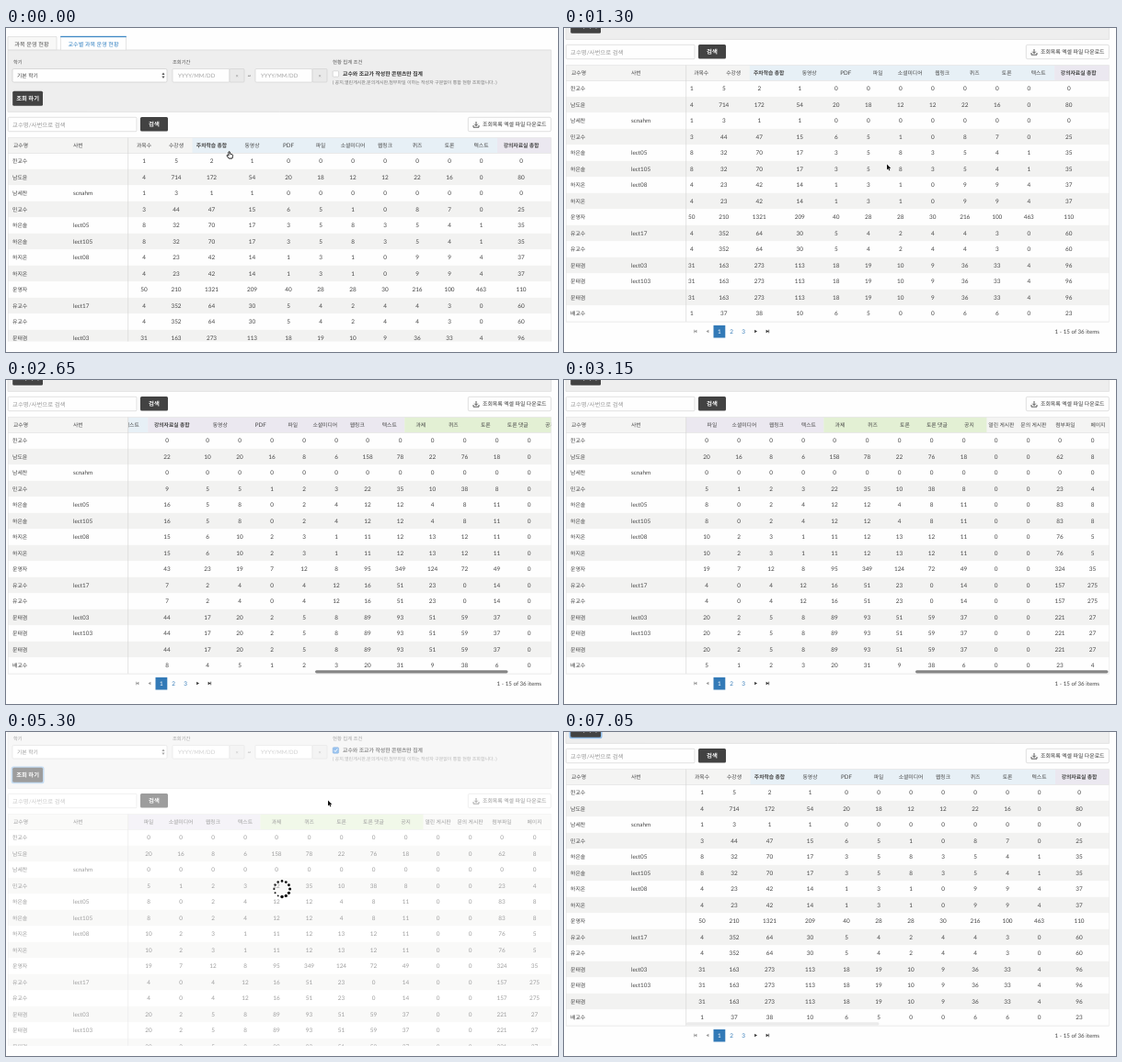
Write an HTML page with a canvas that moves like this. It is 600 px wide and 353 px high and loops after 7.1 s.

```html
<!DOCTYPE html>
<html lang="ko">
<head>
<meta charset="utf-8">
<style>
html, body { margin: 0; width: 100%; height: 100%; overflow: hidden; background: #fefefe; }
canvas { display: block; width: 600px; height: 353px; }
</style>
</head>
<body>
<canvas id="stage"></canvas>
<script>
const W = 600, H = 353, LOOP = 7100;
const VIEW_H = 341.5, LEFT = 2, RIGHT = 592.5, FREEZE = 133, ROW_H = 17.5;
const MAX_X = 536.5, MAX_Y = 79;
const FONT = 'Lato, "Noto Sans CJK KR", "Noto Sans CJK", "Noto Sans", sans-serif';
const INK = '#444', DARK = '#424242';

const canvas = document.getElementById('stage');
const ctx = canvas.getContext('2d');
const dpr = window.devicePixelRatio || 1;
canvas.width = W * dpr;
canvas.height = H * dpr;

// column label and centre
const COLS = [
  ['과목수', 150], ['수강생', 185], ['주차학습 총합', 223.5], ['동영상', 267.5], ['PDF', 307],
  ['파일', 342], ['소셜미디어', 377], ['웹링크', 412], ['퀴즈', 447], ['토론', 482],
  ['텍스트', 516.5], ['강의자료실 총합', 560], ['동영상', 612.5], ['PDF', 656.5], ['파일', 691.5],
  ['소셜미디어', 726.5], ['웹링크', 761.5], ['텍스트', 796.5], ['과제', 830.5], ['퀴즈', 866],
  ['토론', 901], ['토론 댓글', 936], ['공지', 971], ['열린 게시판', 1006], ['문의 게시판', 1041],
  ['첨부파일', 1075.5], ['페이지', 1111]
];
// header tint: from, to, colour
const GROUPS = [[202.5, 534, '#e7f0f6'], [534, 813, '#ebe8f0'], [813, 990, '#e3f0d4']];

const STATS = {
  한교수: '1 5 2 1',
  남도윤: '4 714 172 54 20 18 12 12 22 16 0 80 22 10 20 16 8 6 158 78 22 76 18 0 0 62 8',
  남세찬: '1 3 1 1',
  민교수: '3 44 47 15 6 5 1 0 8 7 0 25 9 5 5 1 2 3 22 35 10 38 8 0 0 23 4',
  하은솔: '8 32 70 17 3 5 8 3 5 4 1 35 16 5 8 0 2 4 12 12 4 8 11 0 0 83 8',
  하지온: '4 23 42 14 1 3 1 0 9 9 4 37 15 6 10 2 3 1 11 12 13 12 11 0 0 76 5',
  운영자: '50 210 1321 209 40 28 28 30 216 100 463 110 43 23 19 7 12 8 95 349 124 72 49 0 0 324 35',
  유교수: '4 352 64 30 5 4 2 4 4 3 0 60 7 2 4 0 4 12 16 51 23 0 14 0 0 157 275',
  문태겸: '31 163 273 113 18 19 10 9 36 33 4 96 44 17 20 2 5 8 89 93 51 59 37 0 0 221 27',
  배교수: '1 37 38 10 6 5 0 0 6 6 0 23 8 4 5 1 2 3 20 31 9 38 6 0 0 23 4'
};
const ROWS = [
  ['한교수'], ['남도윤'], ['남세찬', 'scnahm'], ['민교수'], ['하은솔', 'lect05'], ['하은솔', 'lect105'],
  ['하지온', 'lect08'], ['하지온'], ['운영자'], ['유교수', 'lect17'], ['유교수'],
  ['문태겸', 'lect03'], ['문태겸', 'lect103'], ['문태겸'], ['배교수']
].map(([name, id = '']) => ({ name, id, cells: STATS[name].split(' ') }));

// motion tracks: [time, value...], eased when the last item is true
const SCROLL_Y = [[350, 0], [1000, 79], [3450, 79], [3900, 17.5], [3980, 17.5], [4200, 30], [5650, 30], [6050, 79]];
const BODY_X = [[1250, 0], [1300, 11], [1400, 38], [2200, 313], [2950, 520], [3080, MAX_X], [6200, MAX_X], [6880, 0]];
const HEAD_X = [[1290, 0], [1300, 0.7], [1500, 22], [2200, 228.5], [2950, 480], [3150, 530.5], [3200, MAX_X], [6250, MAX_X], [6980, 0]];
const MOUSE_X = [[200, 243], [1000, 351], [3450, 351], [3950, 343], [4050, 343], [4250, 358], [4400, 358], [4700, 24], [4850, 24], [5200, 350]];
const MOUSE_Y = [[200, 138], [1000, 151], [3450, 151], [3950, 36], [4050, 36], [4250, 21], [4400, 21], [4700, 48], [4850, 48], [5200, 77]];

const smooth = u => u * u * (3 - 2 * u);
const linear = u => u;

function track(keys, t, ease = smooth) {
  if (t <= keys[0][0]) return keys[0][1];
  for (let i = 1; i < keys.length; i++) {
    const [t0, a] = keys[i - 1], [t1, b] = keys[i];
    if (t <= t1) return a + (b - a) * ease((t - t0) / (t1 - t0));
  }
  return keys[keys.length - 1][1];
}

// 1 between a and b, fading in and out around them
const pulse = (t, a, b, fade = 150) =>
  Math.max(0, Math.min(1, (t - a) / 60, (b + fade - t) / fade));

function text(str, x, y, size = 5.8, color = INK, align = 'left', weight = 400) {
  ctx.font = `${weight} ${size}px ${FONT}`;
  ctx.fillStyle = color;
  ctx.textAlign = align;
  ctx.fillText(str, x, y + size * 0.36);
}

function rect(x, y, w, h, fill) {
  ctx.fillStyle = fill;
  ctx.fillRect(x, y, w, h);
}

function box(x, y, w, h, r, fill, stroke) {
  ctx.beginPath();
  ctx.roundRect(x, y, w, h, r);
  ctx.fillStyle = fill;
  ctx.fill();
  if (stroke) {
    ctx.strokeStyle = stroke;
    ctx.lineWidth = 0.6;
    ctx.stroke();
  }
}

function poly(points, fill) {
  ctx.beginPath();
  points.forEach(([x, y]) => ctx.lineTo(x, y));
  ctx.closePath();
  ctx.fillStyle = fill;
  ctx.fill();
}

function clipTo(x, y, w, h, draw) {
  ctx.save();
  ctx.beginPath();
  ctx.rect(x, y, w, h);
  ctx.clip();
  draw();
  ctx.restore();
}

function drawTabs() {
  rect(LEFT, 23.7, RIGHT - LEFT, 0.6, '#d4d4d4');
  box(2, 9.5, 53, 14.5, 0, '#f8f8f7', '#d4d4d4');
  text('과목 운영 현황', 28, 18, 6.2, '#555', 'center');
  box(59.5, 9.5, 71, 14.8, 0, '#fefefe', '#d4d4d4');
  rect(59.2, 8.8, 71.6, 1.3, '#3d87c4');
  text('교수별 과목 운영 현황', 95, 18, 6.1, '#2f7fc1', 'center');
}

function drawDate(x) {
  box(x, 44.5, 62, 14.5, 1, '#fefefe', '#cfcfcf');
  box(x + 62, 44.5, 16, 14.5, 1, '#e9e9e9', '#cfcfcf');
  text('YYYY/MM/DD', x + 6, 51.8, 6, '#a2a2a2');
  text('×', x + 70, 51.8, 5.5, '#8a8a8a', 'center');
}

function drawFilters(checked, focused) {
  box(LEFT, 24.2, RIGHT - LEFT, 67.2, 0, '#eeeeee', '#d9d9d9');
  text('학기', 8, 37.5, 5.3, '#555');
  box(7, 44.5, 168, 14.5, 1.5, '#fefefe', '#c4c4c4');
  text('기본 학기', 12, 51.7, 5.8);
  poly([[169.4, 51], [171, 48.4], [172.6, 51]], '#555');
  poly([[169.4, 52.4], [171, 55], [172.6, 52.4]], '#555');
  text('조회기간', 181, 37.5, 5.3, '#555');
  drawDate(181);
  text('~', 264.5, 51.8, 6.5, INK, 'center');
  drawDate(271);
  text('현황 집계 조건', 355, 37.5, 5.4, '#555');
  box(355.2, 46.8, 6.4, 6.4, 1, checked ? '#3b8be0' : '#fefefe', checked ? '#2f78c8' : '#c4c4c4');
  if (checked) {
    ctx.beginPath();
    ctx.moveTo(356.7, 50);
    ctx.lineTo(358, 51.5);
    ctx.lineTo(360.3, 48.3);
    ctx.strokeStyle = '#fff';
    ctx.lineWidth = 0.9;
    ctx.stroke();
  }
  text('교수와 조교가 작성한 콘텐츠만 집계', 366, 50, 5.9, '#333', 'left', 700);
  text('( 공지,열린게시판,문의게시판,첨부파일 이하는 작성자 구분없이 통합 현황 조회합니다. )', 355, 59.2, 5, '#777');
  if (focused) box(5.7, 67.4, 35.8, 18.8, 2.5, '#8fbbe6');
  box(7.2, 68.8, 32.8, 16, 1.5, DARK);
  text('조회 하기', 23.6, 76.8, 6.3, '#fff', 'center', 700);
}

function drawToolbar() {
  box(2.3, 97.3, 139.7, 15.4, 1, '#fefefe', '#cfcfcf');
  text('교수명/사번으로 검색', 7, 105.2, 6.4, '#999');
  box(146, 97, 30, 15.5, 1.5, DARK);
  text('검색', 161, 104.9, 6.4, '#fff', 'center', 700);
  box(502.3, 97.3, 90, 15.4, 1.5, '#fefefe', '#cccccc');
  ctx.beginPath();
  for (const [x, y, dx, dy] of [[511, 102, 0, 4.5], [511, 106.5, -1.8, -1.8], [511, 106.5, 1.8, -1.8]]) {
    ctx.moveTo(x, y);
    ctx.lineTo(x + dx, y + dy);
  }
  ctx.moveTo(508, 106);
  ctx.lineTo(508, 108.2);
  ctx.lineTo(514, 108.2);
  ctx.lineTo(514, 106);
  ctx.strokeStyle = '#333';
  ctx.lineWidth = 0.8;
  ctx.stroke();
  text('조회목록 엑셀 파일 다운로드', 518, 105.1, 5.9, '#333', 'left', 500);
}

function drawTable(headX, bodyX, barAlpha) {
  const top = 119.5, bodyTop = 136.3, paneW = RIGHT - FREEZE;
  const bottom = bodyTop + ROWS.length * ROW_H;

  rect(LEFT, top, RIGHT - LEFT, bodyTop - top, '#f4f4f3');
  text('교수명', 8, 127.7);
  text('사번', 73, 127.7);
  clipTo(FREEZE, top, paneW, bodyTop - top, () => {
    ctx.translate(-headX, 0);
    GROUPS.forEach(([a, b, fill]) => rect(a, top, b - a, bodyTop - top, fill));
    COLS.forEach(([label, x]) =>
      text(label, x, 127.7, label === 'PDF' ? 6.2 : 5.8, INK, 'center', label.endsWith('총합') ? 700 : 400));
  });

  ROWS.forEach((row, i) => {
    const y = bodyTop + i * ROW_H, mid = y + ROW_H / 2;
    rect(LEFT, y, RIGHT - LEFT, ROW_H, i % 2 ? '#f2f2f1' : '#fefefe');
    text(row.name, 7, mid, 5.9);
    text(row.id, 73, mid, 6.3);
    clipTo(FREEZE, y, paneW, ROW_H, () => {
      COLS.forEach(([, x], c) => text(row.cells[c] || '0', x - bodyX, mid, 6.4, INK, 'center'));
    });
  });

  rect(LEFT, top, RIGHT - LEFT, 0.5, '#dcdcdc');
  rect(LEFT, bodyTop - 0.3, RIGHT - LEFT, 0.6, '#dcdcdc');
  rect(LEFT, bottom, RIGHT - LEFT, 0.6, '#dcdcdc');
  rect(LEFT, top, 0.5, bottom - top, '#e2e2e2');
  rect(RIGHT - 0.5, top, 0.5, bottom - top, '#e2e2e2');
  rect(FREEZE - 0.5, top, 0.6, bottom - top, '#d2d2d2');

  if (barAlpha > 0) {
    ctx.globalAlpha = barAlpha;
    box(FREEZE + bodyX / MAX_X * 249, 395.2, 209.5, 3.2, 1.6, '#858585');
    ctx.globalAlpha = 1;
  }
}

function drawPager() {
  const y = 409.5;
  const arrow = (x, dir, bar) => {
    poly([[x - dir * 1.4, y - 1.8], [x + dir * 1.5, y], [x - dir * 1.4, y + 1.8]], dir < 0 ? '#999' : '#333');
    if (bar) rect(x + dir * 1.7 - 0.3, y - 1.8, 0.7, 3.6, dir < 0 ? '#999' : '#333');
  };
  arrow(143, -1, true);
  arrow(156, -1);
  arrow(208.5, 1);
  arrow(221, 1, true);
  rect(162.5, 403, 12.8, 13.5, '#337ab7');
  text('1', 168.8, y, 6.4, '#fff', 'center');
  text('2', 182, y, 6.4, '#337ab7', 'center');
  text('3', 195, y, 6.4, '#337ab7', 'center');
  text('1 - 15 of 36 items', 582, y, 6.2, INK, 'right');
}

function drawSpinner(t) {
  const n = 12, lead = Math.floor(t / 83);
  for (let i = 0; i < n; i++) {
    const a = i / n * Math.PI * 2;
    const age = ((lead - i) % n + n) % n / n;
    ctx.beginPath();
    ctx.arc(300 + 8.6 * Math.cos(a), 171 + 8.6 * Math.sin(a), 1.75 - age * 0.9, 0, Math.PI * 2);
    ctx.fillStyle = '#111';
    ctx.fill();
  }
}

const ARROW = new Path2D('M0 0 L0 6 L1.4 4.8 L2.4 7 L3.4 6.5 L2.5 4.4 L4.3 4.2 Z');
const HAND = new Path2D('M-1 -3 Q-.3 -3.8 .3 -3 L.5 -.8 L3 -.2 Q3.8 .2 3.5 1.6 L2.8 4 L-.8 4 L-3 1 Q-2.8 0 -1.8 .5 L-.9 1.2 Z');

function drawCursor(x, y, hand) {
  ctx.save();
  ctx.translate(x, hand ? y : y - 2.5);
  ctx.lineWidth = 0.8;
  ctx.lineJoin = 'round';
  ctx.fillStyle = hand ? '#fff' : '#111';
  ctx.strokeStyle = hand ? '#222' : '#fff';
  const shape = hand ? HAND : ARROW;
  ctx.stroke(shape);
  ctx.fill(shape);
  if (hand) ctx.stroke(shape);
  ctx.restore();
}

function draw(t) {
  const y = track(SCROLL_Y, t);
  const busy = t >= 4850 && t < 5600;
  ctx.setTransform(dpr, 0, 0, dpr, 0, 0);
  ctx.textRendering = 'geometricPrecision';
  rect(0, 0, W, H, '#fefefe');

  clipTo(0, 0, W, VIEW_H, () => {
    ctx.save();
    ctx.translate(0, -y);
    drawTabs();
    drawFilters(t >= 4350, t >= 4800);
    drawToolbar();
    const barAlpha = Math.max(pulse(t, 1310, 3350), pulse(t, 6180, 6890, 190));
    drawTable(track(HEAD_X, t, linear), track(BODY_X, t, linear), barAlpha);
    drawPager();
    ctx.restore();
    if (busy) rect(0, 0, W, H, 'rgba(255,255,255,0.48)');
  });
  if (busy) drawSpinner(t);

  const bar = Math.max(pulse(t, 340, 1150), pulse(t, 3430, 4350), pulse(t, 5630, 6100, 50));
  if (bar > 0) {
    ctx.globalAlpha = bar;
    box(595.2, y / MAX_Y * 64, 3.2, 290 - 14, 1.6, '#808080');
    ctx.globalAlpha = 1;
  }
  if (t < 1700 || (t > 3400 && t < 6200)) {
    drawCursor(track(MOUSE_X, t), track(MOUSE_Y, t), t < 250);
  }
}

const start = performance.now();
function tick() {
  draw((performance.now() - start) % LOOP);
  requestAnimationFrame(tick);
}
tick();
</script>
</body>
</html>
```
